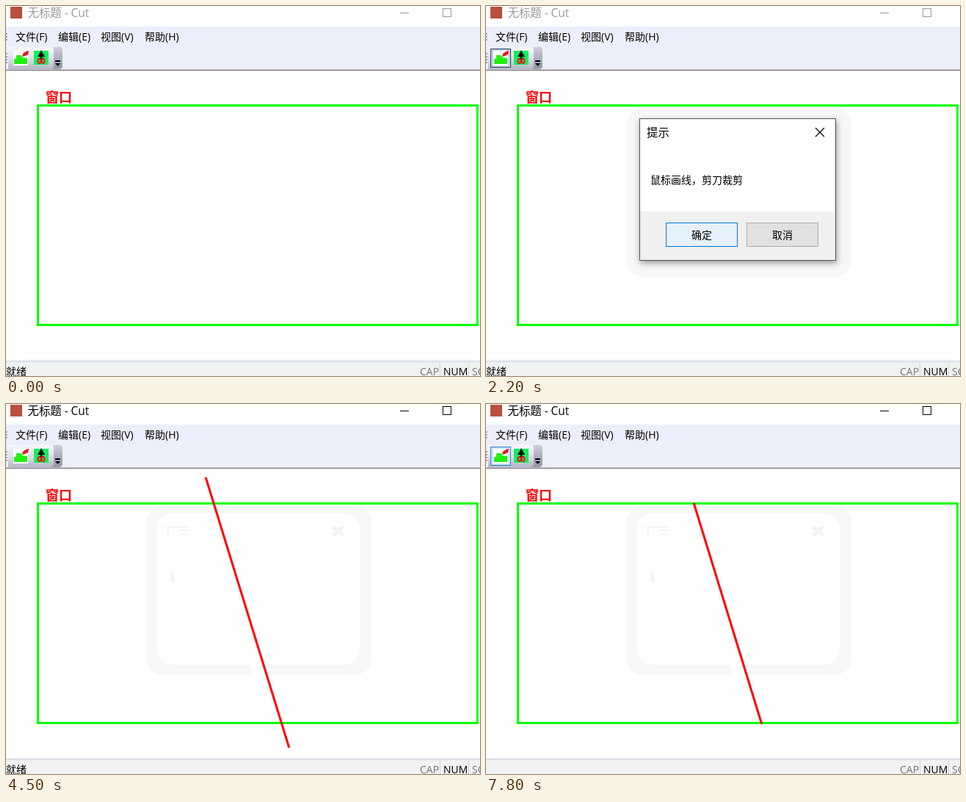
An HTML page that plays this animation: 646x504 px, repeating every 8000 ms.

```html
<!DOCTYPE html>
<html lang="zh-CN">
<head>
<meta charset="utf-8">
<title>Cut</title>
<style>
html, body { margin: 0; width: 100%; height: 100%; overflow: hidden; background: #fff; }
svg { display: block; width: 646px; height: 504px; }
text { font: 14px "Open Sans", "Noto Sans CJK SC", "Noto Sans CJK", sans-serif; }
.crisp { shape-rendering: crispEdges; }
.red { fill: none; stroke: #f00; stroke-width: 3; stroke-linecap: round; }

/* Every change is a hard step on one 8 s clock: 1.25% = 100 ms */
.t { animation: 8s step-end infinite; }

#caption { animation-name: caption; }
@keyframes caption {
  0%, 16.25% { color: #999; }
  15%, 35%, 100% { color: #000; }
}

#ready { animation-name: ready; }
@keyframes ready {
  0%, 15%, 86.25%, 95% { opacity: 1; }
  10%, 77.5%, 93.75%, 97.5%, 100% { opacity: 0; }
}

.tool { stroke-width: 1; }
#draw { animation-name: draw; }
@keyframes draw {
  0%, 35% { fill: transparent; stroke: transparent; }
  10%, 97.5%, 100% { fill: #c9e3f8; stroke: #2f7fc4; }
  15% { fill: #c3cfe4; stroke: #26405f; }
}
#cut { animation-name: cut; }
@keyframes cut {
  0%, 86.25%, 100% { fill: transparent; stroke: transparent; }
  77.5%, 83.75% { fill: #b2dcf6; stroke: #2f7fc4; }
  82.5% { fill: #9fc4e4; stroke: #26405f; }
}
#more { animation-name: more; }
@keyframes more {
  0%, 95%, 100% { opacity: 0; }
  93.75% { opacity: 1; }
}

#dialog, #halo { transform-origin: 343px 250px; }
#dialog { animation-name: dialog; }
@keyframes dialog {
  0%, 36.25%, 100% { opacity: 0; transform: scale(.94); }
  16.25% { opacity: .12; transform: scale(.95); }
  17.5%, 35% { opacity: .4; transform: scale(.97); }
  18.75% { opacity: .8; transform: scale(.99); }
  20% { opacity: 1; transform: none; }
}
#halo { animation-name: halo; }
@keyframes halo {
  0% { opacity: 0; transform: scale(.94); }
  16.25% { opacity: .2; transform: scale(.95); }
  17.5% { opacity: .6; transform: scale(.965); }
  18.75% { opacity: .85; transform: scale(.99); }
  20%, 100% { opacity: 1; transform: none; }
}
#frame { filter: drop-shadow(1px 3px 4px rgba(0, 0, 0, .4)); }
#ok { animation-name: ok; }
@keyframes ok {
  0% { fill: #e1e1e1; stroke: #0078d7; }
  26.25% { fill: #e3e9ee; stroke: #73b5e9; }
  27.5%, 100% { fill: #e5f1fb; stroke: #e5f1fb; }
}

#trace { animation-name: trace; }
@keyframes trace { 0% { opacity: 0; } 35%, 100% { opacity: 1; } }
#gap { animation-name: gap; }
@keyframes gap { 0% { opacity: 0; } 53.75%, 100% { opacity: 1; } }

#line { animation-name: line; }
@keyframes line {
  0% { d: path("M272 101L285 172"); opacity: 0; }
  48.75% { d: path("M272.5 101L284.5 172"); opacity: 1; }
  50% { d: path("M272.5 101L299 240"); }
  51.25% { d: path("M272.5 101L315 305"); }
  52.5% { d: path("M272.5 101L333 362"); }
  53.75% { d: path("M272.5 101L353 420"); }
  55% { d: path("M272.5 101L375 453"); }
  56.25% { d: path("M272.5 101L385.5 467"); }
  83.75%, 100% { d: path("M283.5 136L375.5 435"); opacity: 1; }
}
</style>
</head>
<body>
<svg viewBox="0 0 646 504">
  <defs>
    <linearGradient id="bar" x2="0" y2="1">
      <stop stop-color="#f6f7fb"/><stop offset=".5" stop-color="#dfe0ea"/><stop offset="1" stop-color="#b4b5c4"/>
    </linearGradient>
    <linearGradient id="end" x2="0" y2="1">
      <stop stop-color="#cdced8"/><stop offset="1" stop-color="#9293a3"/>
    </linearGradient>
  </defs>

  <!-- Title bar -->
  <rect width="646" height="504" fill="#fff"/>
  <rect x="6" y="1" width="16" height="16" fill="#b9503f"/>
  <g id="caption" class="t">
    <text x="29.5" y="15" fill="currentColor" style="font-size:15.4px">无标题 - Cut</text>
    <path class="crisp" d="M537 9.5h12M595.5 3.5h11v11h-11z" fill="none" stroke="currentColor"/>
  </g>

  <!-- Menu and toolbar -->
  <rect y="28" width="646" height="59" fill="#eceffb"/>
  <path d="M.5 37v11M.5 64v16" stroke="#8f909c" stroke-width="2" stroke-dasharray="2"/>
  <text x="13" y="47">文件(F)</text>
  <text x="71" y="47">编辑(E)</text>
  <text x="129" y="47">视图(V)</text>
  <text x="189" y="47">帮助(H)</text>
  <path d="M64 56h9q4 0 4 4v21q0 5-5 5h-12q5-1 5-6z" fill="url(#end)"/>
  <path d="M3 56h58q4 0 4 4v21q0 5-4 5H3z" fill="url(#bar)"/>
  <path d="M.5 64v16" stroke="#8f909c" stroke-width="2" stroke-dasharray="2"/>
  <path id="more" class="t" d="M65 57h8q4 0 4 4v20q0 5-5 5h-7z" fill="#b2dcf6"/>
  <path d="M67 74h7v2h-7zM67 78h7l-3.5 4z"/>
  <rect y="86" width="646" height="1" fill="#cfcfda"/>
  <rect y="87" width="646" height="1" fill="#716a70"/>

  <rect id="draw" class="tool t" x="6.5" y="58.5" width="27" height="25"/>
  <rect x="10" y="61" width="20" height="20" fill="#fff"/>
  <path d="M11 72h3v-5h7l1 3 7 1v8H11z" fill="#20f010"/>
  <path d="M22 69l1-4 4-3 4-1-1 5-4 2z" fill="#e8151b"/>

  <rect id="cut" class="tool t" x="34.5" y="58.5" width="27" height="25"/>
  <rect x="38" y="61" width="20" height="19" fill="#14ee5c"/>
  <path d="M48 60l2 4 3 5h-3.5v3h-3v-3H43l3-5z"/>
  <g fill="none" stroke="#e8151b" stroke-width="2">
    <ellipse cx="45.5" cy="75" rx="2" ry="3"/><ellipse cx="50.5" cy="75" rx="2" ry="3"/>
  </g>

  <!-- Status bar -->
  <rect y="482" width="646" height="22" fill="#f1f2f2"/>
  <rect y="482" width="646" height="1" fill="#e6e8ec"/>
  <rect y="484" width="646" height="1" fill="#cdd5e2"/>
  <path class="crisp" d="M591.5 486v18M630.5 486v18" stroke="#cfd3da"/>
  <text id="ready" class="t" x="0" y="503">就绪</text>
  <text x="564" y="503" fill="#777">CAP</text>
  <text x="596" y="503">NUM</text>
  <text x="635" y="503" fill="#777">SCRL</text>

  <!-- Faint area left behind by the dialog -->
  <rect id="halo" class="t" x="192" y="139" width="306" height="230" rx="22" fill="#f7f7f7"/>
  <g id="trace" class="t">
    <rect x="205" y="149" width="277" height="206" rx="22" fill="#fff"/>
    <path d="M219 167.5h32M220.5 167v14M235 172h14M237 178h12" fill="none" stroke="#f3f3f3" stroke-width="2"/>
    <path d="M446 167l14 12M460 167l-14 12" stroke="#f3f3f3" stroke-width="5"/>
    <path d="M227 230v13" stroke="#ededed" stroke-width="3"/>
  </g>
  <path id="gap" class="t" d="M331 354h20l4 16h-19z" fill="#fff"/>

  <!-- Clip window -->
  <text x="54" y="131" fill="#f00" style="font-size:18px;font-weight:700">窗口</text>
  <rect class="crisp" x="43.5" y="135.5" width="599" height="299" fill="none" stroke="#0f0" stroke-width="3"/>
  <path id="line" class="red t" d="M272 101L285 172"/>

  <!-- Message box -->
  <g id="dialog" class="t">
    <rect id="frame" x="209.5" y="153.5" width="267" height="193" fill="#fff" stroke="#555"/>
    <rect x="210" y="280" width="266" height="66" fill="#f0f0f0"/>
    <text x="219" y="178" style="font-size:15.4px">提示</text>
    <path d="M449 166l12 12M461 166l-12 12" stroke="#000" stroke-width="1.2"/>
    <text x="224" y="242">鼠标画线，剪刀裁剪</text>
    <rect x="245.5" y="295.5" width="97" height="32" fill="none" stroke="#0078d7"/>
    <rect id="ok" class="t" x="246.5" y="296.5" width="95" height="30"/>
    <rect x="355.5" y="295.5" width="97" height="32" fill="#e1e1e1" stroke="#adadad"/>
    <text x="280" y="317">确定</text>
    <text x="390" y="317">取消</text>
  </g>
</svg>
</body>
</html>
```
